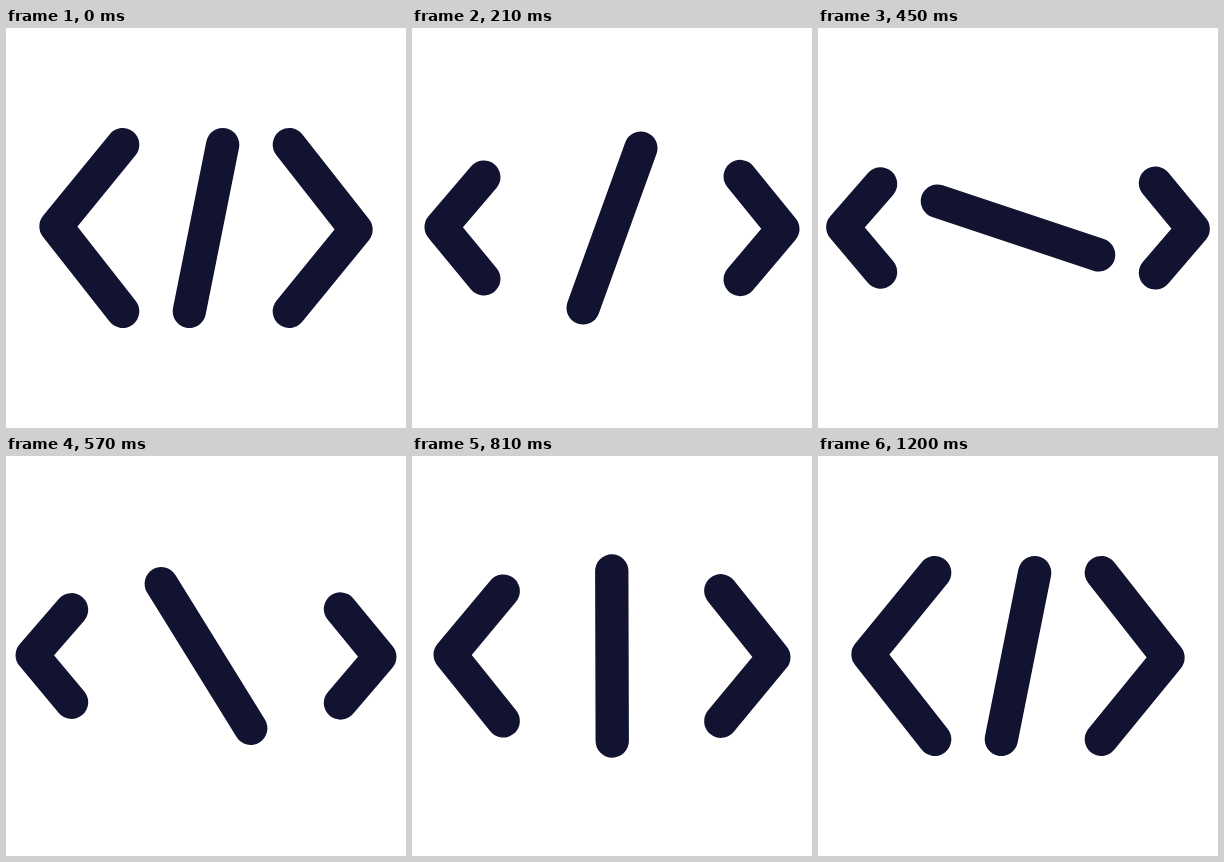
An HTML page for the animation above (2.23 s loop, 400 px wide and 400 px high).

```html
<!DOCTYPE html>
<html lang="en">
<head>
<meta charset="utf-8">
<title>Code icon</title>
<style>
  html, body { margin: 0; width: 100%; height: 100%; overflow: hidden; background: #fff; }
  svg { display: block; width: 100%; height: 100%; }
  path { fill: none; stroke: #121331; stroke-width: 33.33; stroke-linecap: round; stroke-linejoin: round; }
</style>
</head>
<body>
<svg viewBox="0 0 400 400">
  <path id="left"/>
  <path id="slash" d="M216.67 116.67 183.33 283.33"/>
  <path id="right"/>
</svg>
<script>
  const LOOP = 2230, STEP = 30, MOVE = 1200, PEAK = 400;
  const [left, slash, right] = ['left', 'slash', 'right'].map(id => document.getElementById(id));

  // Each bracket: end, vertex, end as x, y pairs
  const brackets = [
    { el: left, wide: [116.67, 116.67, 50, 198.4, 116.67, 283.33], small: [62.3, 156.1, 24.7, 199.2, 62.3, 243.9] },
    { el: right, wide: [283.33, 116.67, 350, 201.6, 283.33, 283.33], small: [337.7, 155.3, 375.3, 200.8, 337.7, 244.7] }
  ];

  function bezier(x1, y1, x2, y2) {
    const at = (a, b, s) => 3 * (1 - s) ** 2 * s * a + 3 * (1 - s) * s * s * b + s ** 3;
    return x => {
      if (x <= 0) return 0;
      if (x >= 1) return 1;
      let lo = 0, hi = 1;
      for (let i = 0; i < 30; i++) {
        const mid = (lo + hi) / 2;
        if (at(x1, x2, mid) < x) lo = mid; else hi = mid;
      }
      return at(y1, y2, lo);
    };
  }

  const swing = bezier(0.523, -0.03, 0.103, 1);
  const settle = bezier(0.574, 0, 0.423, 1);

  function draw(ms) {
    const t = Math.min(Math.floor((ms % LOOP) / STEP) * STEP, MOVE);
    const squeeze = t < PEAK ? swing(t / PEAK) : 1 - settle((t - PEAK) / (MOVE - PEAK));
    for (const { el, wide, small } of brackets) {
      const points = wide.map((v, i) => (v + (small[i] - v) * squeeze).toFixed(3));
      el.setAttribute('d', 'M' + points.join(' '));
    }
    slash.setAttribute('transform', `rotate(${(180 * swing(t / MOVE)).toFixed(3)} 200 200)`);
  }

  const start = performance.now();
  function tick() {
    draw(performance.now() - start);
    requestAnimationFrame(tick);
  }
  tick();
</script>
</body>
</html>
```
